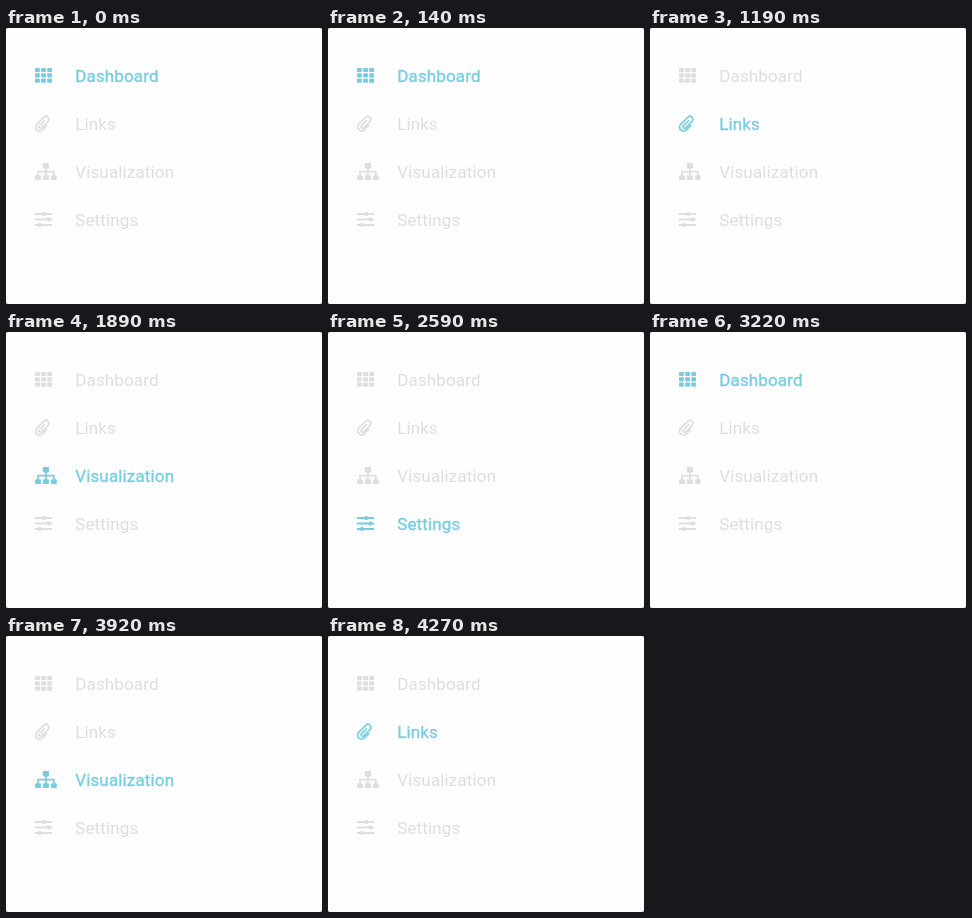
Animation of 316x276 px, one loop 4.62 s. Source, as an HTML page:

```html
<!DOCTYPE html>
<html lang="en">
<head>
<meta charset="utf-8">
<title>Menu</title>
<style>
  html, body { margin: 0; width: 100%; height: 100%; overflow: hidden; background: #555; }
  svg { display: block; width: 316px; height: 276px; }
  text { font: 400 17px Roboto, sans-serif; letter-spacing: .15px; }
  .item { color: #dddee1; fill: currentColor; }
  .item.active { color: #76cde2; }
  .active text { stroke: currentColor; stroke-width: .35; }
  .line { fill: none; stroke: currentColor; stroke-width: 1.7; stroke-linecap: round; }
</style>
</head>
<body>
<svg viewBox="0 0 316 276">
  <rect width="316" height="276" rx="2" fill="#fefefe"/>
  <g id="menu"></g>
</svg>
<script>
const LOOP = 4620;
// [start time in ms, active row]
const steps = [[0, 0], [1190, 1], [1890, 2], [2590, 3], [3220, 0], [3920, 2], [4270, 1]];

const box = (x, y, w, h, r = 1) =>
  `<rect x="${x}" y="${y}" width="${w}" height="${h}" rx="${r}"/>`;

// Icons are drawn relative to the row's vertical centre.
const grid = [0, 1, 2].flatMap(row =>
  [0, 1, 2].map(col => box(29 + col * 6.1, -8 + row * 5.3, 4.9, 4.1, .8))).join("");

const clip = `<path class="line" transform="translate(37.1 -.4) rotate(45)"
  d="M4-1V5a4 4 0 0 1-8 0V-5a3 3 0 0 1 6 0V4a1.5 1.5 0 0 1-3 0V-3"/>`;

const tree = box(36.8, -9, 6.2, 5.4) +
  [29, 36.9, 44.8].map(x => box(x, 3.2, 6, 4.8)).join("") +
  `<path class="line" d="M39.9-4V3M32 3V-.4H47.8V3"/>`;

const sliders = [[-6, 37], [-.5, 41], [5, 32.5]].map(([y, knob]) =>
  box(28.8, y - .9, 17.4, 1.8, .4) + box(knob, y - 2.1, 2.8, 4.2, .8)).join("");

const rows = [["Dashboard", grid], ["Links", clip], ["Visualization", tree], ["Settings", sliders]];
const menu = document.getElementById("menu");
menu.innerHTML = rows.map(([label, icon], i) =>
  `<g class="item" transform="translate(0 ${48 + i * 48})">${icon}<text x="69.2" y="6">${label}</text></g>`).join("");

function draw() {
  const time = performance.now() % LOOP;
  const active = steps.findLast(([start]) => start <= time)[1];
  [...menu.children].forEach((item, i) => item.classList.toggle("active", i === active));
  requestAnimationFrame(draw);
}
draw();
</script>
</body>
</html>
```
